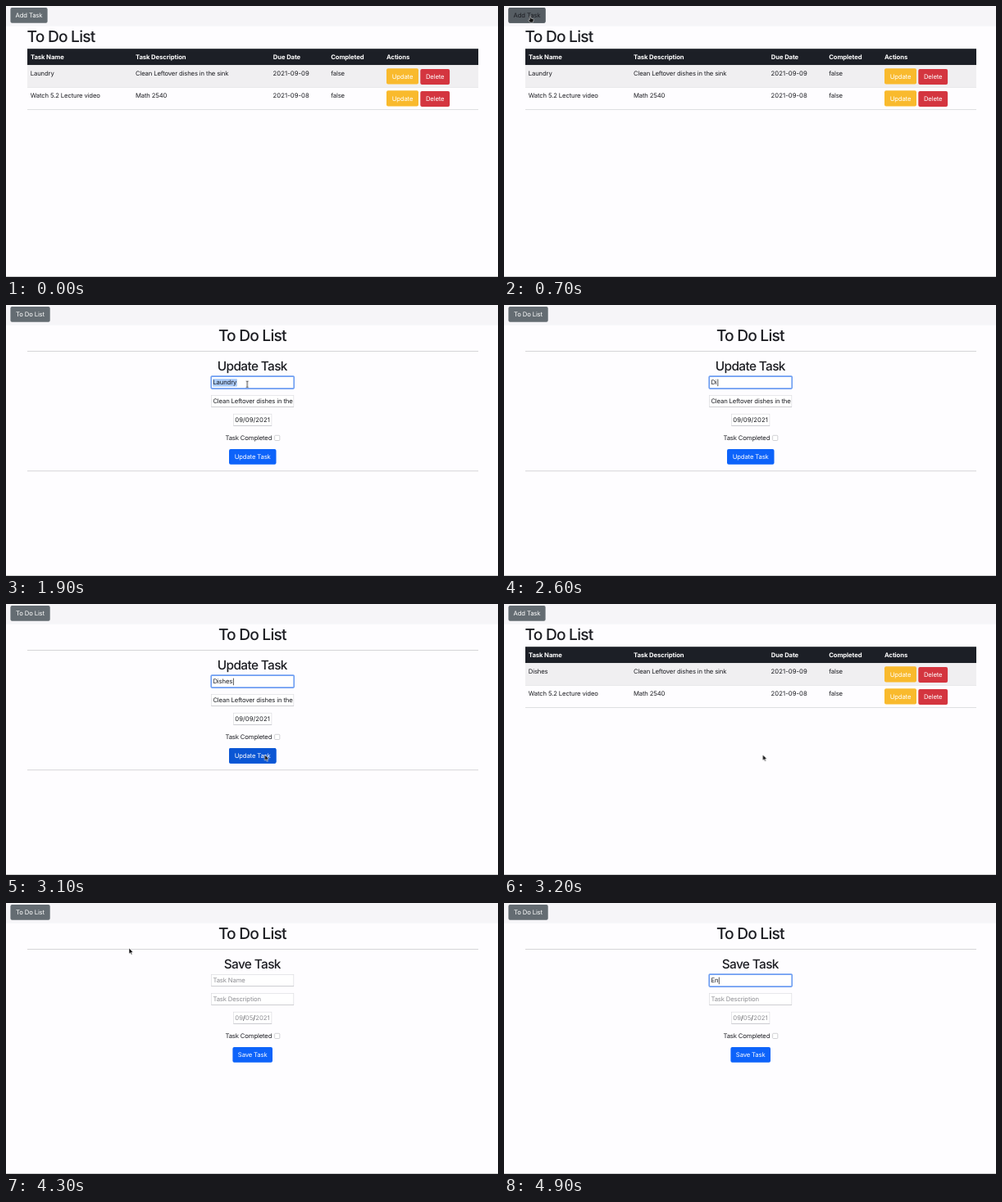
An HTML page for the animation above (5 s loop, 600 by 331 pixels).

```html
<!DOCTYPE html>
<html lang="en">
<head>
<meta charset="utf-8">
<title>To Do List</title>
<style>
html, body { margin: 0; width: 100%; height: 100%; overflow: hidden; background: #fefdff; }
svg { display: block; width: 100vw; height: 100vh; }
text {
  font: 400 7.7px Inter, "Open Sans", sans-serif;
  letter-spacing: -.14px;
  fill: #1c1d22;
  text-rendering: geometricPrecision;
  white-space: pre;
}
.h1 { font-size: 19.2px; font-weight: 500; letter-spacing: -.8px; }
.h2 { font-size: 15.4px; font-weight: 500; letter-spacing: -.62px; }
.head text { font-weight: 700; letter-spacing: -.1px; fill: #fff; }
.num { letter-spacing: .05px; }
.mid { text-anchor: middle; }
.lite { fill: #fff; }
.dim { fill: #8d8d92; }
.grey { fill: #646c72; }
.gold { fill: #f9ba2d; }
.red { fill: #d4353f; }
.blue { fill: #0d63fa; }
.rule { fill: #cbcbce; }
.box { fill: #fff; stroke: #dcdce0; stroke-width: .7; }
.edge { fill: #bdbdc2; }

/* one loop is 5 s, so 2% is 100 ms */
.a { animation: 5s step-end infinite; }
.list { animation-name: list; }
.form { animation-name: form; }
.early { animation-name: early; }
.late { animation-name: late; }
.hot-add { animation-name: hot-add; }
.hot-edit { animation-name: hot-edit; }
.hot-del { animation-name: hot-del; }
.hot-send { animation-name: hot-send; }
.focus { animation-name: focus; }
.old { animation-name: old; }
.mark { animation-name: mark; }
.hint { animation-name: hint; }
.caret { animation-name: caret; }
.pointer { animation-name: pointer; }
.arrow { animation-name: arrow; }
.hand { animation-name: hand; }
.beam { animation-name: beam; }
.key { fill-opacity: 0; animation: key 5s var(--d) step-end infinite; }

@keyframes list { 0%, 64% { opacity: 1 } 28%, 84% { opacity: 0 } }
@keyframes form { 0%, 64% { opacity: 0 } 28%, 84% { opacity: 1 } }
@keyframes early { 0% { opacity: 1 } 64% { opacity: 0 } }
@keyframes late { 0% { opacity: 0 } 64% { opacity: 1 } }
@keyframes hot-add { 0%, 16%, 84% { opacity: 0 } 12%, 76% { opacity: 1 } }
@keyframes hot-edit { 0%, 28% { opacity: 0 } 24% { opacity: 1 } }
@keyframes hot-del { 0%, 8% { opacity: 0 } 6% { opacity: 1 } }
@keyframes hot-send { 0%, 48%, 64% { opacity: 0 } 46%, 62% { opacity: 1 } }
@keyframes focus { 0%, 64% { opacity: 0 } 34%, 90% { opacity: 1 } }
@keyframes old { 0% { opacity: 1 } 48% { opacity: 0 } }
@keyframes mark { 0%, 48% { opacity: 0 } 38% { opacity: 1 } }
@keyframes hint { 0% { opacity: 1 } 94% { opacity: 0 } }
@keyframes key { 0% { fill-opacity: 1 } 40% { fill-opacity: 0 } }

@keyframes caret {
  0%, 64% { opacity: 0; transform: translate(252.4px, 0) }
  34% { opacity: 1; transform: translate(282px, 0) }
  38% { opacity: 0; transform: translate(252.4px, 0) }
  48% { opacity: 1; transform: translate(258.2px, 0) }
  52% { opacity: 1; transform: translate(260.3px, 0) }
  54% { opacity: 1; transform: translate(264.1px, 0) }
  56% { opacity: 1; transform: translate(268.5px, 0) }
  58% { opacity: 1; transform: translate(272.9px, 0) }
  60% { opacity: 1; transform: translate(276.9px, 0) }
  92% { opacity: 1; transform: translate(252.4px, 0) }
  94% { opacity: 1; transform: translate(257.3px, 0) }
  98% { opacity: 1; transform: translate(261.8px, 0) }
}
@keyframes arrow {
  0%, 12%, 24%, 32%, 48%, 76%, 88% { opacity: 0 }
  2%, 16%, 28%, 40%, 62%, 84% { opacity: 1 }
}
@keyframes hand { 0%, 16%, 28%, 84% { opacity: 0 } 12%, 24%, 76% { opacity: 1 } }
@keyframes beam { 0%, 40%, 94% { opacity: 0 } 32%, 88% { opacity: 1 } }
@keyframes pointer {
  0% { transform: translate(352px, 198px) }
  4% { transform: translate(450px, 160px) }
  6% { transform: translate(520px, 112px) }
  8% { transform: translate(430px, 62px) }
  10% { transform: translate(190px, 30px) }
  12% { transform: translate(34px, 11px) }
  14% { transform: translate(32px, 12px) }
  16% { transform: translate(90px, 30px) }
  18% { transform: translate(220px, 58px) }
  20% { transform: translate(345px, 76px) }
  22% { transform: translate(440px, 84px) }
  24% { transform: translate(484px, 84px) }
  26% { transform: translate(479.5px, 83px) }
  30% { transform: translate(400px, 92px) }
  32% { transform: translate(308px, 96px) }
  34% { transform: translate(294.2px, 96.8px) }
  40% { transform: translate(298px, 120px) }
  42% { transform: translate(306px, 158px) }
  44% { transform: translate(312px, 172px) }
  46% { transform: translate(315.5px, 184px) }
  66% { transform: translate(300px, 170px) }
  68% { transform: translate(250px, 135px) }
  70% { transform: translate(170px, 90px) }
  72% { transform: translate(85px, 45px) }
  74% { transform: translate(33px, 21px) }
  76% { transform: translate(29px, 11px) }
  80% { transform: translate(27.5px, 10px) }
  82% { transform: translate(26.5px, 9.5px) }
  86% { transform: translate(150px, 55px) }
  88% { transform: translate(285px, 93px) }
  90% { transform: translate(288.5px, 95px) }
  92% { transform: translate(289px, 95px) }
}
</style>
</head>
<body>
<svg viewBox="0 0 600 331" preserveAspectRatio="none">
  <defs>
    <clipPath id="field"><rect x="251" y="109" width="99.4" height="17"/></clipPath>
    <g id="buttons">
      <rect class="gold" x="464" y="76.3" width="39" height="19.1" rx="2"/>
      <text class="mid lite" x="483.5" y="88.8">Update</text>
      <rect class="red" x="505.3" y="76.9" width="35.8" height="19" rx="2"/>
      <text class="mid lite" x="523.2" y="89.3">Delete</text>
    </g>
  </defs>

  <rect width="600" height="331" fill="#fefdff"/>
  <rect width="600" height="24.6" fill="#f6f5f8"/>
  <rect class="rule" y="330" width="600" height="1"/>

  <g class="a list">
    <rect class="grey" x="5.4" y="2" width="45.2" height="18.7" rx="2"/>
    <text class="mid lite" x="28" y="14.2">Add Task</text>
    <g class="a hot-add">
      <rect x="5.4" y="2" width="45.2" height="18.7" rx="2" fill="#565d63"/>
      <text class="mid" x="28" y="14.2">Add Task</text>
    </g>

    <text class="h1" x="25.6" y="43.7">To Do List</text>
    <g class="head">
      <rect x="26" y="52.2" width="550" height="20" fill="#1c1f26"/>
      <text x="30" y="65.1">Task Name</text>
      <text x="158" y="65.1">Task Description</text>
      <text x="325.8" y="65.1">Due Date</text>
      <text x="396.2" y="65.1">Completed</text>
      <text x="464" y="65.1">Actions</text>
    </g>

    <rect x="26" y="72.2" width="550" height="27" fill="#f0eff1"/>
    <rect x="26" y="99" width="550" height=".6" fill="#dcdde0"/>
    <text class="a early" x="29.8" y="85.2">Laundry</text>
    <text class="a late" x="29.8" y="85.2">Dishes</text>
    <text x="158" y="85.2">Clean Leftover dishes in the sink</text>
    <text class="num" x="325.6" y="85.2">2021-09-09</text>
    <text x="396.2" y="85.2">false</text>
    <use href="#buttons"/>
    <g class="a hot-edit">
      <rect x="464" y="76.3" width="39" height="19.1" rx="2" fill="#fcbb2f"/>
      <text class="mid" x="483.5" y="88.8">Update</text>
    </g>

    <rect x="26" y="126" width="550" height=".8" fill="#d6d7da"/>
    <text x="29.8" y="112.2">Watch 5.2 Lecture video</text>
    <text x="158" y="112.2">Math 2540</text>
    <text class="num" x="325.6" y="112.2">2021-09-08</text>
    <text x="396.2" y="112.2">false</text>
    <use href="#buttons" y="27"/>
    <g class="a hot-del">
      <rect x="505.3" y="103.9" width="35.8" height="19" rx="2" fill="#b52e3a"/>
      <text class="mid lite" x="523.2" y="116.3">Delete</text>
    </g>
  </g>

  <g class="a form">
    <rect class="grey" x="5.4" y="2" width="48.3" height="18.7" rx="2"/>
    <text class="mid lite" x="29.5" y="14.2">To Do List</text>
    <text class="mid h1" x="300.3" y="43.7">To Do List</text>
    <rect class="rule" x="26" y="56" width="550" height=".8"/>

    <rect class="box" x="250.5" y="87.5" width="100.3" height="14.2"/>
    <rect class="edge" x="250.5" y="101.4" width="100.5" height=".6"/>
    <rect class="a focus" x="250.2" y="87.1" width="101" height="15" rx="1" fill="#fff" stroke="#6d9df2" stroke-width="1.6"/>
    <rect class="box" x="250.5" y="110.3" width="100.3" height="14.2"/>
    <rect class="edge" x="250.5" y="124.2" width="100.5" height=".6"/>
    <rect class="box" x="277.5" y="133.2" width="46.4" height="14.4"/>
    <rect class="edge" x="277.5" y="147.3" width="46.6" height=".6"/>
    <text x="267.4" y="164.9">Task Completed</text>
    <rect x="327.6" y="159.3" width="6.2" height="6.2" rx="1" fill="#fff" stroke="#b2b2b7" stroke-width=".6"/>

    <g class="a early">
      <text class="mid h2" x="300.3" y="80">Update Task</text>
      <rect class="a mark" x="252.2" y="90.2" width="29.6" height="9.4" fill="#a9caf8"/>
      <text class="a old" x="252.4" y="97.4">Laundry</text>
      <text x="252.4" y="97.4"><tspan class="key" style="--d:2.4s">D</tspan><tspan class="key" style="--d:2.6s">i</tspan><tspan class="key" style="--d:2.7s">s</tspan><tspan class="key" style="--d:2.8s">h</tspan><tspan class="key" style="--d:2.9s">e</tspan><tspan class="key" style="--d:3s">s</tspan></text>
      <text x="252.4" y="120.2" clip-path="url(#field)">Clean Leftover dishes in the sink</text>
      <text class="num" x="279.3" y="143.2">09/09/2021</text>
      <rect class="blue" x="272" y="176" width="57.5" height="18.7" rx="2"/>
      <rect class="a hot-send" x="272" y="176" width="57.5" height="18.7" rx="2" fill="#0b56d4"/>
      <text class="mid lite" x="300.7" y="188.2">Update Task</text>
      <rect class="rule" x="26" y="202.4" width="550" height=".8"/>
    </g>

    <g class="a late">
      <text class="mid h2" x="300.3" y="80">Save Task</text>
      <text class="a hint dim" x="252.4" y="97.4">Task Name</text>
      <text x="252.4" y="97.4"><tspan class="key" style="--d:4.7s">E</tspan><tspan class="key" style="--d:4.9s">n</tspan></text>
      <text class="dim" x="252.4" y="120.2">Task Description</text>
      <text class="num dim" x="279.3" y="143.2">09<tspan fill="#1c1d22">/</tspan>05<tspan fill="#1c1d22">/</tspan>2021</text>
      <rect class="blue" x="276.4" y="176" width="48.6" height="18.7" rx="2"/>
      <text class="mid lite" x="300.7" y="188.2">Save Task</text>
    </g>

    <rect class="a caret" y="90.6" width=".7" height="8.6" fill="#111"/>
  </g>

  <g class="a pointer">
    <path class="a arrow" d="M0 0V7.2L1.7 5.7L2.8 8.3L4 7.8L2.9 5.2H5.1Z" fill="#0c0c0e" stroke="#fff" stroke-width=".6"/>
    <path class="a hand" d="M-.7 .6Q0 -.4 .7 .6V3L3.6 3.7Q4.3 4 4.1 5L3.4 8H-.4L-2.4 5Q-2.2 4 -.7 5Z" fill="#111" stroke="#e6e6e6" stroke-width=".5"/>
    <path class="a beam" d="M-1.4 -3.8Q0 -3.8 0 -3V3Q0 3.8 -1.4 3.8M1.4 -3.8Q0 -3.8 0 -3M0 3Q0 3.8 1.4 3.8" fill="none" stroke="#111" stroke-width=".8"/>
  </g>
</svg>
</body>
</html>
```
